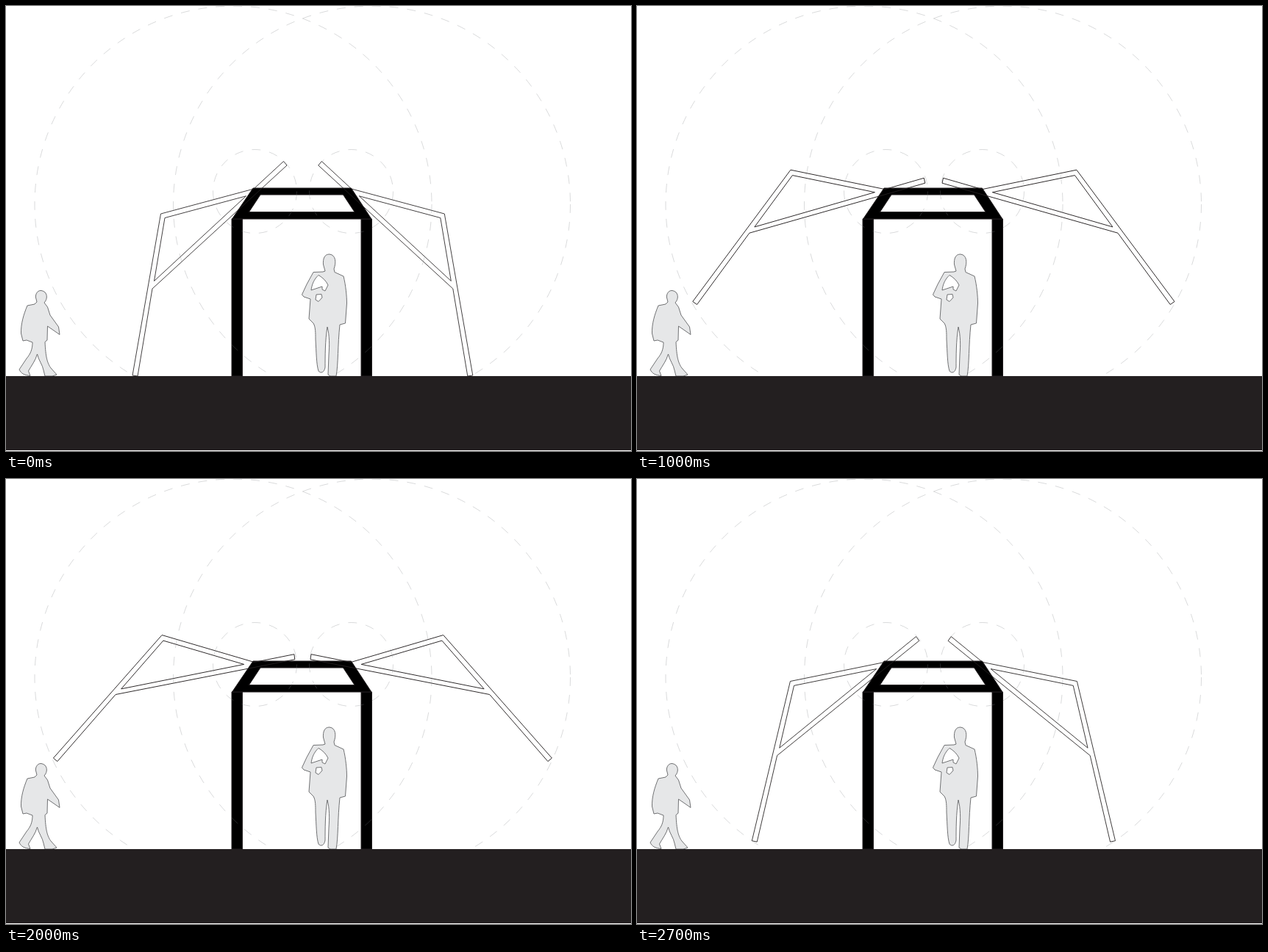
Animation, 850 px wide and 606 px high, one loop 2800 ms. Source, as an HTML page:

```html
<!DOCTYPE html>
<html lang="en">
<head>
<meta charset="utf-8">
<title>Folding canopy section</title>
<style>
  html, body { margin: 0; width: 100%; height: 100%; overflow: hidden; background: #fff; }
  svg { display: block; width: 850px; height: 606px; }
  .outline { fill: none; stroke: #231f20; stroke-width: .85; }
  .orbit { fill: none; stroke: #808285; stroke-opacity: .4; stroke-width: .75; stroke-dasharray: 12 12; }
  .frame { fill: #000; stroke: #231f20; stroke-width: 1; }
  .person { fill: #e6e7e8; fill-rule: evenodd; stroke: #636466; stroke-width: .9; stroke-linejoin: round; }
</style>
</head>
<body>
<svg viewBox="0 0 850 606">
  <defs>
    <path id="wing" fill-rule="evenodd" d="M210.5 283 L172 503 L179 504 L199 385 L382 217 L377.5 211.5 L337 249 Z
      M216 288.5 L326.5 258.8 L201.5 374.5 Z"/>
    <g id="wings">
      <use href="#wing" class="turn"/>
      <g transform="matrix(-1 0 0 1 806.8 0)"><use href="#wing" class="turn"/></g>
    </g>
  </defs>

  <use href="#wings" fill="#fff"/>

  <g class="frame">
    <path d="M307 290 H321.5 V504 H307 Z M483 290 H497.500 V504 H483 Z"/>
    <path fill-rule="evenodd" d="M336 248 H469.5 L497 290 H307.5 Z M346 257 L330.5 280.5 H474 L458.5 257 Z"/>
  </g>
  <use href="#wings" class="outline"/>

  <g class="orbit">
    <circle cx="309" cy="270" r="270"/>
    <circle cx="497.5" cy="270" r="270"/>
    <circle cx="338.5" cy="252.5" r="57"/>
    <circle cx="469.5" cy="252.5" r="57"/>
  </g>

  <g class="person">
    <path d="M48 387.5 C42 387 39 394 41 399 L42 403 L39 406 L29 408 C24 420 20 433 20.5 446 L23 456 L28 455 L36 458
      C36 468 33 474 28 480 L18 495 C20 500 25 503 33 503.5 L30.5 497 C35 489 40 483 42.500 474 C44 482 50 489 51 496 L53 504
      H63 L69 502 L61 493 C56 486 54 478 53 457.500 L56 455 L56.5 436 L73 447.5 L71.5 437 L60 421 L56.500 410 L52 404
      C57 399 57 389 48 387.5 Z"/>
    <path d="M440 338 C433 338 431 344 431.5 352 L434 361 L431 362 L418 362.5 L409 379 L402.5 393 L405 396 L414 399
      L412 426 L418 432 C421 437 421 445 421 454 C422 470 422 488 425 497 C428 501 433 499 434 492
      C434 478 434 455 437 437 C440 448 440 462 439 475 L438 502 L441 504 H449 C452 488 451 462 454 434
      L461.5 432 L463.500 405 C463.500 395 462 380 459 368 L447 362.500 L446 358 C449 350 449 339 440 338 Z
      M425 366.5 C419 372 416 379 415 387 L430 382 L430 386 L434 388 L438 380 C435 374 431 370 425 366.5 Z
      M422 393 L429 392.5 L430 397 L425 402.5 L421 400 Z"/>
  </g>

  <rect y="504" width="850" height="101" fill="#231f20"/>
</svg>
<script>
  const STEP = 100, TICKS = 28, HOLD = 3, MOVES = 11, SWING = 41.9;
  const turning = document.querySelectorAll('.turn');
  const start = performance.now();

  // Nearly even swing: slower at first, quickest past the middle.
  const swing = x => SWING * x - 1.5 * Math.sin(2 * Math.PI * x ** 1.53);

  function draw(time) {
    const tick = Math.floor(time / STEP) % TICKS;
    const raised = Math.min(Math.max(tick - HOLD, 0), MOVES, TICKS - tick) / MOVES;
    const bulge = Math.sin(Math.PI * raised);
    const drift = `translate(${-1.4 * bulge} ${Math.sqrt(Math.abs(bulge))})`;
    for (const part of turning) {
      part.setAttribute('transform', `${drift} rotate(${swing(raised)} 338.5 252)`);
    }
  }

  function loop() {
    draw(performance.now() - start);
    requestAnimationFrame(loop);
  }
  loop();
</script>
</body>
</html>
```
